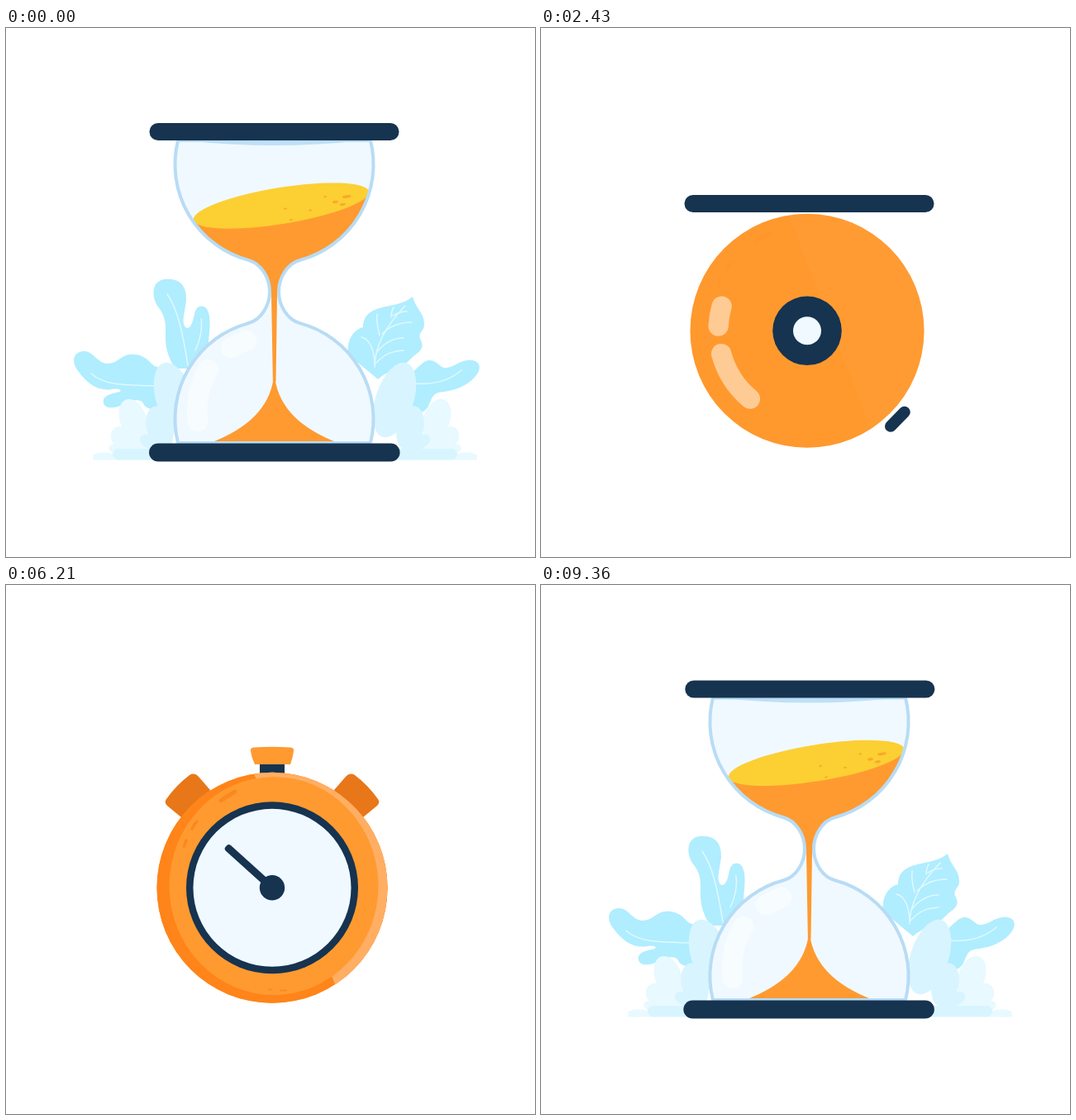
Animation of 640 by 640 pixels, one loop 9430 ms. Source, as an HTML page with a canvas:

```html
<!DOCTYPE html>
<html lang="en">
<head>
<meta charset="utf-8">
<title>Hourglass and stopwatch</title>
<style>
html, body { margin: 0; width: 100%; height: 100%; overflow: hidden; background: #fff; }
canvas { display: block; width: 100vmin; height: 100vmin; margin: 0 auto; }
</style>
</head>
<body>
<canvas id="stage" width="640" height="640"></canvas>
<script>
const ctx = document.getElementById('stage').getContext('2d');
const LOOP = 9430, TAU = Math.PI * 2, DEG = Math.PI / 180;
const NAVY = '#163350', ORANGE = '#ff9a30', YELLOW = '#fccf33', PALE = '#f0f9ff', EDGE = '#b8dcf5';
const CX = 324.5, FLOOR = 502, BX = 322, BY = 366.3;

const lerp = (a, b, p) => a + (b - a) * p;
const smooth = p => 0.5 - 0.5 * Math.cos(Math.PI * p);
const linear = p => p;

// Value at t from pairs [time, value, time, value, ...]
function track(t, keys, ease = smooth) {
  if (t <= keys[0]) return keys[1];
  for (let i = 2; i < keys.length; i += 2) {
    if (t < keys[i]) {
      return lerp(keys[i - 1], keys[i + 1], ease((t - keys[i - 2]) / (keys[i] - keys[i - 2])));
    }
  }
  return keys[keys.length - 1];
}

function fill(path, color) { ctx.fillStyle = color; ctx.fill(path); }

function disc(x, y, r, color) {
  if (r <= 0) return;
  ctx.beginPath();
  ctx.arc(x, y, r, 0, TAU);
  ctx.fillStyle = color;
  ctx.fill();
}

function oval(x, y, rx, ry, rot, color) {
  ctx.beginPath();
  ctx.ellipse(x, y, rx, ry, rot * DEG, 0, TAU);
  ctx.fillStyle = color;
  ctx.fill();
}

function bar(x, y, w, h, r, color) {
  if (w <= 0 || h <= 0) return;
  ctx.beginPath();
  ctx.roundRect(x, y, w, h, Math.min(r, w / 2, h / 2));
  ctx.fillStyle = color;
  ctx.fill();
}

function stroke(path, width, color, cap = 'round') {
  ctx.lineCap = cap;
  ctx.lineWidth = width;
  ctx.strokeStyle = color;
  ctx.stroke(path);
}

// Plants: outline, veins, pivot, hiding offset, turn when hidden, turn while growing
const LEAVES = [
  {
    shape: 'M210 425C195 408 183 414 176 406C168 397 160 394 150 395C138 396 136 406 122 406C110 405 106 391 94 391C80 392 79 405 88 416C98 430 112 440 128 437C138 435 143 439 134 441C124 443 116 446 118 454C121 462 134 460 142 455C152 450 162 448 166 454C168 462 185 464 210 462Z',
    veins: 'M103 418C120 434 150 432 185 433',
    pivot: [200, 440], hide: [170, 20], fold: 10, grow: 17
  },
  {
    shape: 'M205 412C198 402 192 388 193 370C194 352 190 345 183 336C176 324 176 306 192 304C212 302 219 314 218 330C216 346 212 356 217 362C223 366 226 356 228 346C230 336 238 334 243 340C248 348 247 360 245 380L240 412Z',
    veins: 'M195 322C208 340 214 370 220 408M236 352C238 365 234 380 229 390',
    pivot: [215, 410], hide: [60, 55], fold: 0, grow: -31
  },
  {
    shape: 'M492 325C496 340 506 345 506 358C506 368 497 368 502 378C508 390 495 394 490 400C480 412 460 415 450 425L414 395C412 380 418 366 432 362C432 345 445 340 460 337C475 334 485 331 492 325Z',
    veins: 'M446 410C446 390 455 365 483 336M446 408C446 390 440 376 430 374M452 372C449 360 448 352 449 346M455 370C465 360 478 356 491 356M448 393C458 380 470 375 481 375M466 350Q466 343 469 338M468 348Q476 343 485 343M447 406C460 392 470 391 481 390',
    pivot: [446, 410], hide: [-166, -10], fold: 0, grow: 0
  },
  {
    shape: 'M480 430C488 420 498 410 506 404C514 399 520 404 526 409C535 416 545 404 558 402C572 400 577 410 569 420C560 432 545 438 530 440C515 441 516 448 512 455C508 466 500 466 490 466L470 460Z',
    veins: 'M492 430C515 432 535 428 551 414',
    pivot: [480, 440], hide: [-146, -20], fold: -15, grow: -12
  }
].map(l => ({ ...l, shape: new Path2D(l.shape), veins: new Path2D(l.veins) }));

function bush() {
  const soft = '#e8f9ff', mid = '#d8f5ff';
  bar(105, 520, 235, 2.5, 1, soft);
  oval(118, 518, 13, 4.5, 0, soft);
  oval(154, 474, 16, 26, -20, soft);
  oval(140, 496, 12, 15, -35, soft);
  oval(134, 510, 10, 6, 20, soft);
  oval(160, 505, 24, 16, 0, soft);
  oval(205, 450, 23, 47, -18, mid);
  oval(186, 484, 16, 27, -14, mid);
  oval(174, 501, 13, 8, 28, mid);
  bar(129, 509, 80, 13.5, 7, mid);
}

function plants(t) {
  if (t > 2150 && t < 7700) return;
  const out = track(t, [0, 1, 1070, 1.035, 2150, 0, 7700, 0, 8230, 1]);
  const turn = track(t, [7700, 1, 8140, 1, 9400, 0]) * (t > 7000);
  const sway = t < 2150 ? Math.sin(t / 1070 * Math.PI) * 2 * (t < 1070) : 0;
  const hidden = 1 - out;
  for (const l of LEAVES) {
    const [px, py] = l.pivot;
    ctx.save();
    ctx.translate(px + l.hide[0] * hidden, py + l.hide[1] * hidden);
    ctx.rotate((l.fold * hidden + l.grow * turn + sway * Math.sign(l.grow)) * DEG);
    ctx.translate(-px, -py);
    fill(l.shape, '#b0edff');
    stroke(l.veins, 1.5, '#e0f9ff');
    ctx.restore();
  }
  for (const side of [1, -1]) {
    ctx.save();
    ctx.translate(337.5, 0);
    ctx.scale(side, 1);
    ctx.translate(-337.5 + 130 * hidden + 3 * turn, 0);
    bush();
    ctx.restore();
  }
}

// Glass outline between the caps
function glassShape(top, mid, sx, sy) {
  const p = new Path2D(), r = 120;
  const a = Math.asin(29 / r), b = Math.acos(31 / r);
  const upper = mid - 154 * sy, lower = mid + 154 * sy;
  const X = (s, dx) => CX + s * dx;
  const neck = (s, dir) => p.bezierCurveTo(
    X(s, dir > 0 ? 31 * sx - 15 : 5.5), mid - (dir > 0 ? 34 : 17) * sy,
    X(s, 5.5), mid - 17 * sy, X(s, 5.5), mid);
  const flare = s => p.bezierCurveTo(X(s, 5.5), mid + 17 * sy,
    X(s, 31 * sx - 15), mid + 34 * sy, X(s, 31 * sx), lower - 116 * sy);
  p.ellipse(CX, upper, r * sx, r * sy, 0, Math.PI + a, Math.PI - b, true);
  neck(-1, 1);
  flare(-1);
  p.ellipse(CX, lower, r * sx, r * sy, 0, Math.PI + b, Math.PI - a, true);
  p.lineTo(X(1, 116.5 * sx), FLOOR);
  p.ellipse(CX, lower, r * sx, r * sy, 0, a, -b, true);
  p.bezierCurveTo(X(1, 31 * sx - 15), mid + 34 * sy, X(1, 5.5), mid + 17 * sy, X(1, 5.5), mid);
  p.bezierCurveTo(X(1, 5.5), mid - 17 * sy, X(1, 31 * sx - 15), mid - 34 * sy, X(1, 31 * sx), upper + 116 * sy);
  p.ellipse(CX, upper, r * sx, r * sy, 0, b, -a, true);
  p.closePath();
  return p;
}

const GRAINS = [[79.7, 1.7, 5.5, 1.7], [65, 5.9, 3.5, 1.6], [73.3, 10.3, 3.5, 1.6],
  [54, -2.4, 2, 1], [33.7, 11, 2, 1], [9.1, 18.7, 2, 1], [4.4, 4.3, 2, 1]];

function topSand(t, mid, sx, sy) {
  const level = t < 4000 ? track(t, [0, 104, 1860, 65, 2200, 50], linear) : 104;
  const flat = t < 4000 ? track(t, [0, 22, 1860, 3.2], linear) : track(t, [8140, 3.2, 9100, 22]);
  const y = mid - level * sy;
  const rx = Math.sqrt(120 ** 2 - (154 - level) ** 2) * sx * 0.985;
  const end = t > 4000 ? track(t, [8140, mid - 7, 8200, mid], linear) : mid;
  ctx.save();
  ctx.translate(333, y);
  ctx.rotate(-lerp(0.128, 0.16, (flat - 3.2) / 18.8));
  const sand = new Path2D();
  sand.rect(-220, 0, 440, 250);
  ctx.save();
  ctx.setTransform(1, 0, 0, 1, 0, 0);
  ctx.beginPath();
  ctx.rect(0, 0, 640, end);
  ctx.restore();
  ctx.save();
  ctx.clip();
  fill(sand, ORANGE);
  ctx.restore();
  ctx.scale(rx / 107, flat / 22);
  oval(0, 0, 107, 22, 0, YELLOW);
  if (flat > 6) for (const [gx, gy, w, h] of GRAINS) oval(gx, gy, w, h, 0, '#f9a92c');
  ctx.restore();
}

function stream(t, mid) {
  if (t > 4000 && t < 8140) return;
  const late = t > 4000;
  const apex = late ? track(t, [8350, FLOOR, 9360, 425]) : track(t, [0, 425, 1860, 420], linear);
  const tip = late ? Math.min(apex, track(t, [8140, mid - 6, 8350, FLOOR], p => p * p)) : apex;
  const q = late ? 0 : Math.min(1.1, t / 1860);
  const w = lerp(3.6, 2.4, q);
  const flow = new Path2D();
  flow.moveTo(CX - w, mid - 2);
  flow.lineTo(CX + w, mid - 2);
  flow.lineTo(CX + 2, tip + 3);
  flow.lineTo(CX - 1.6, tip + 3);
  fill(flow, ORANGE);

  const h = FLOOR - apex;
  const base = late ? 83 * Math.min(1, h / 77) : lerp(83, 100.5, q);
  if (h < 0.5) return;
  const u = base * (1 - lerp(0.89, 0.34, q)), v = FLOOR - h * lerp(0.31, 0.63, q);
  const pile = new Path2D();
  pile.moveTo(CX - base, FLOOR + 2);
  pile.quadraticCurveTo(CX - u, v, CX - 1, apex);
  pile.lineTo(CX + 1, apex);
  pile.quadraticCurveTo(CX + u, v, CX + base, FLOOR + 2);
  fill(pile, ORANGE);
}

function hourglass(t, top) {
  const h = FLOOR - top, sy = h / 366, sx = 1 - 0.49 * (sy - 1), mid = top + h / 2;
  const shape = glassShape(top, mid, sx, sy);
  fill(shape, PALE);
  ctx.save();
  ctx.clip(shape);
  const lid = new Path2D();
  lid.moveTo(CX - 108 * sx, top);
  lid.quadraticCurveTo(CX, top + 12, CX + 108 * sx, top);
  fill(lid, '#c0e0f6');
  topSand(t, mid, sx, sy);
  stream(t, mid);
  ctx.restore();

  const X = x => CX + (x - CX) * sx, Y = y => FLOOR - (FLOOR - y) * sy;
  const shine = new Path2D();
  shine.moveTo(X(232), Y(476));
  shine.quadraticCurveTo(X(228), Y(440), X(245), Y(413));
  shine.moveTo(X(272), Y(387));
  shine.lineTo(X(291), Y(378));
  stroke(shine, 25 * sx * sx, 'rgba(255,255,255,.45)');
  stroke(shape, 4, EDGE);
}

const SIDE = new Path2D('M247 248L234 233Q228 226 222 230Q206 242 194 259Q191 263 195 267L212 281L235 290Z');
const KNOB = new Path2D('M296 201Q295 197 300 196.5Q322 195 344 196.5Q349 197 348 201Q347 209 344 217L301 217Q297 209 296 201Z');
const MARKS = [['M260 261Q268 255 277 250', 5], ['M225 295Q227 290 231 286', 3.5],
  ['M215.5 316L218 309', 3.5], ['M318 489L321 489.5', 2], ['M332 490.5L339 490.5', 2]]
  .map(([d, w]) => [new Path2D(d), w]);

function sideKnobs(t) {
  const inset = 55 * (1 - track(t, [3300, 0, 3560, 1.08, 3700, 1, 6760, 1, 6990, 0]));
  if (inset > 54) return;
  for (const side of [1, -1]) {
    ctx.save();
    ctx.translate(BX, 0);
    ctx.scale(side, 1);
    ctx.translate(-BX + inset * 0.72, inset * 0.7);
    fill(SIDE, '#e87719');
    ctx.restore();
  }
}

// The lower cap shrinks, rolls round the ball and becomes the stem
function lowerCap(t) {
  if (t < 2150 || t > 7200) {
    const w = t < 4000 ? 303.5 : track(t, [7200, 0, 7430, 303.5]);
    const shift = t > 4000 ? -0.7 : 0;
    bar(324.8 + shift - w / 2, 502.5, w, 22, 11, NAVY);
    return;
  }
  const a = track(t, [2300, 90, 2690, -90]) * DEG;
  const dist = track(t, [2150, 147, 2400, 153, 2500, 153, 2690, 143.5]);
  const w = track(t, [2150, 303, 2400, 38, 2500, 38, 2690, 30]);
  const h = track(t, [2150, 22, 2400, 14, 2500, 14, 2690, 12]);
  ctx.save();
  ctx.translate(BX, BY);
  ctx.rotate(a);
  ctx.translate(dist - track(t, [7020, 0, 7150, 16]), 0);
  bar(-h / 2, -w / 2, h, w, track(t, [2500, 11, 2690, 0]), NAVY);
  ctx.restore();
}

function capTop(t) {
  if (t < 4000) {
    return track(t, [1070, 115, 2050, 33, 2330, 202, 2450, 202, 2900, 196, 3100, 196, 3300, 121, 3620, 196]);
  }
  return track(t, [7020, 196, 7180, 206, 7650, 0, 8120, 115.5]);
}

function upperCap(t, y) {
  const knob = t < 4000 ? track(t, [2450, 0, 2900, 1]) : track(t, [7180, 1, 7520, 0]);
  if (knob === 1) {
    ctx.save();
    ctx.translate(0, y - 196);
    fill(KNOB, ORANGE);
    ctx.restore();
    return;
  }
  const w = lerp(302, 52, knob), x = lerp(324.5, 322, knob) + (t > 4000 ? 0.8 * (1 - knob) : 0);
  const mix = [[22, 255], [51, 154], [80, 48]].map(([a, b]) => Math.round(lerp(a, b, knob)));
  bar(x - w / 2, y, w, 21, lerp(10.5, 4, knob), `rgb(${mix})`);
}

function ball(t) {
  const r = track(t, [2110, 0, 2290, 167, 2420, 141.5, 2700, 139.5, 3600, 139.5, 3680, 148.5,
    3850, 139.5, 7050, 139.5, 7170, 147, 7450, 0]);
  if (r <= 0) return;
  const rise = track(t, [7170, 0, 7450, -50]);
  ctx.save();
  ctx.translate(BX, BY + rise);
  ctx.scale(r / 139.5, r / 139.5);
  ctx.translate(-BX, -BY);
  disc(BX, BY, 139.5, ORANGE);

  const shade = track(t, [2400, 0.1, 2800, 1, 7000, 1, 7170, 0]);
  ctx.globalAlpha = shade;
  disc(BX, BY, 139.5, '#ff8419');
  ctx.beginPath();
  ctx.arc(BX, BY, 139.5, -99 * DEG, 57 * DEG);
  ctx.fillStyle = '#ffae64';
  ctx.fill();
  oval(324, 364, 126.5, 132, 0, ORANGE);
  ctx.globalAlpha = shade * track(t, [6780, 1, 6990, 0]);
  for (const [d, w] of MARKS) stroke(d, w, '#fb8820');

  ctx.globalAlpha = track(t, [2200, 0, 2340, 1, 2480, 1, 2680, 0]);
  const shine = new Path2D();
  shine.arc(BX, BY, 106, 183 * DEG, 196 * DEG);
  shine.moveTo(BX + 106 * Math.cos(130 * DEG), BY + 106 * Math.sin(130 * DEG));
  shine.arc(BX, BY, 106, 130 * DEG, 165 * DEG);
  stroke(shine, 24, '#ffcb95');
  ctx.globalAlpha = 1;

  disc(BX, BY, track(t, [2270, 0, 2650, 108, 2800, 104, 7000, 104, 7250, 0]), NAVY);
  disc(BX, BY, track(t, [2350, 0, 2650, 99, 2800, 95.5, 7000, 95.5, 7220, 0]), PALE);

  const size = track(t, [2520, 0, 2800, 1, 6780, 1, 6980, 0]);
  if (size > 0) {
    const turn = Math.min(360, Math.max(0, 131 + (t - 4070) * 0.0846));
    ctx.translate(BX, BY);
    ctx.rotate(turn * DEG);
    bar(-4.5, -75 * size, 9, 75 * size, 3.5, NAVY);
    disc(0, 0, 15.2 * size, NAVY);
  }
  ctx.restore();
}

function draw(t) {
  ctx.fillStyle = '#fff';
  ctx.fillRect(0, 0, 640, 640);
  const y = capTop(t);
  plants(t);
  if (t < 2290 || t > 7200) hourglass(t, y + 21);
  lowerCap(t);
  sideKnobs(t);
  ball(t);
  upperCap(t, y);
}

const start = performance.now();
function tick() {
  draw((performance.now() - start) % LOOP);
  requestAnimationFrame(tick);
}
tick();
</script>
</body>
</html>
```
